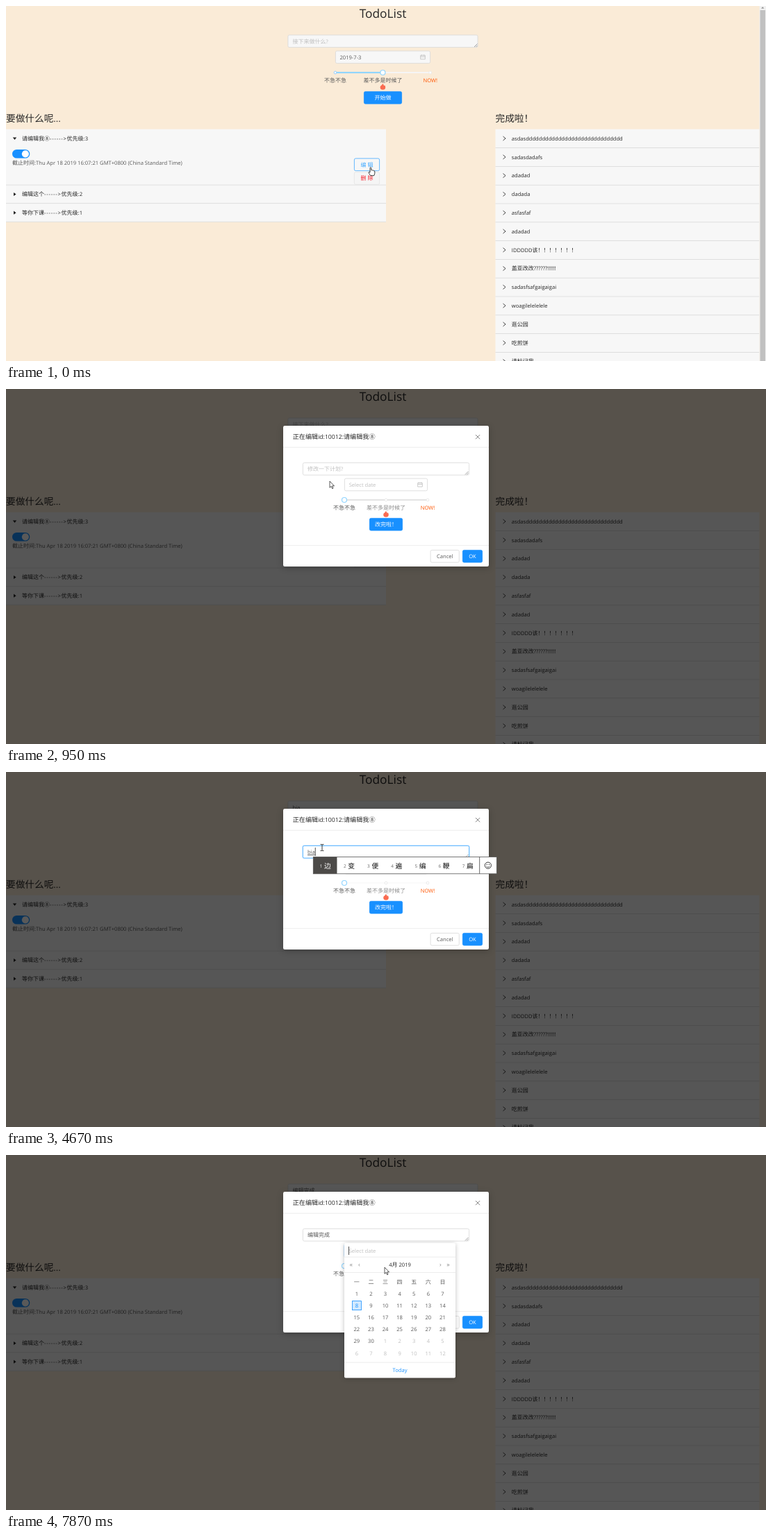
An HTML page that plays this animation: 1094 by 512 pixels, repeating every 7990 ms.

```html
<!DOCTYPE html>
<html lang="zh">
<head>
<meta charset="utf-8">
<title>TodoList</title>
<style>
html, body { margin: 0; width: 100%; height: 100%; overflow: hidden; background: #faebd7; }
svg { display: block; width: 1094px; height: 512px; }
text { font: 8px "Open Sans", "Noto Sans CJK SC", "Noto Sans CJK", sans-serif; text-rendering: geometricPrecision; white-space: pre; }
.latin { font-size: .95em; }
.dash { letter-spacing: .8px; }
</style>
</head>
<body>
<svg id="stage" viewBox="0 0 1094 512"></svg>
<script>
const LOOP = 7990;
const BLUE = '#1890ff', INK = '#595959', DARK = '#262626', HINT = '#bfbfbf', EDGE = '#d9d9d9', PANEL = '#f7f7f7';

// Moments at which the picture is refreshed
const STEPS = [0, 140, 260, 400, 530, 670, 810, 950, 1070, 1190, 1330, 1460, 1890, 2040, 2320, 2820, 3410,
  3820, 4250, 4550, 4700, 4850, 4990, 5140, 5290, 5430, 5580, 5730, 5870, 6000, 6140, 6270,
  6700, 6980, 7140, 7290, 7430, 7580, 7730, 7870];
const KEYS = STEPS.filter(t => t >= 3820 && t <= 6140);
const COMMIT = 6270, PICK = 7140;

// time, x, y, shape
const MOUSE = [[0, 526, 238, 'hand'], [400, 524, 230, 'arrow'], [530, 516, 212, 'arrow'], [670, 498, 181, 'arrow'],
  [810, 480, 156, 'arrow'], [950, 466, 133, 'arrow'], [1070, 457, 114, 'beam'], [1190, 455, 109, 'beam'],
  [6980, 560, 118, 'beam'], [PICK, 587, 141, 'beam'], [7430, 580, 146, 'arrow'], [7580, 563, 155, 'arrow'],
  [7730, 549, 160, 'arrow'], [7870, 545, 162, 'arrow']];

const LETTERS = [...'bianjiwancheng'];
const WORDS = [[1, '不 吧 被 把 并 本 比'], [2, '比 笔 必 币 毕 闭 臂'], [3, '边 变 便 遍 编 鞭 扁'],
  [5, '编剧 编辑 边际 边界 遍及 便捷 变焦'], [6, '编辑 边际 遍及 扁机 苄基 变 边'],
  [7, '编辑完 编辑 遍及 边际 扁机 苄基 边'], [10, '编辑完成 编辑完 编辑 遍及 边际 扁机 苄基'],
  [11, '编辑完成 边际完成 遍及完成 编辑完 编辑 遍及 边际']];
const DONE = ['asdas' + 'd'.repeat(30), 'sadasdadafs', 'adadad', 'dadada', 'asfasfaf', 'adadad', 'IDDDDD该！！！！！！！',
  '盖亚改改??????!!!!!!', 'sadasfsafgaigaigai', 'woagilelelelele', '逛公园', '吃煎饼', '请标记我'];

const pen = document.createElement('canvas').getContext('2d');
const latinWidth = s => (pen.font = '7.6px "Open Sans", sans-serif', pen.measureText(s).width);
const latest = (list, t) => list.filter(e => e[0] <= t).pop();

// Drawing helpers
const text = (x, y, s, fill = INK, more = '') => `<text x="${x}" y="${y}" fill="${fill}" ${more}>` +
  s.replace(/[ -~]+/g, m => `<tspan class="latin${m.startsWith('---') ? ' dash' : ''}">${m.replace('>', '&gt;')}</tspan>`) + '</text>';
const mid = (x, y, s, fill, more = '') => text(x, y, s, fill, 'text-anchor="middle" ' + more);
const size = px => `style="font-size:${px}px"`;
const rect = (x, y, w, h, fill, more = '') => `<rect x="${x}" y="${y}" width="${w}" height="${h}" fill="${fill}" ${more}/>`;
const path = (d, stroke, w = .8, fill = 'none') => `<path d="${d}" stroke="${stroke}" stroke-width="${w}" fill="${fill}"/>`;
const circle = (x, y, r, stroke, w = 1.1, fill = '#fff') => `<circle cx="${x}" cy="${y}" r="${r}" stroke="${stroke}" stroke-width="${w}" fill="${fill}"/>`;
const at = (x, y, s) => `<g transform="translate(${x} ${y})">${s}</g>`;
const rule = (x, y, w, color = EDGE) => rect(x, y, w, .8, color);
const box = (x, y, w, h, fill, edge = EDGE) => rect(x + .4, y + .4, w - .8, h - .8, fill, `rx="2" stroke="${edge}" stroke-width=".8"`);
const button = (x, y, w, h, s, fill = BLUE, color = '#fff', edge = fill) =>
  box(x, y, w, h, fill, edge) + mid(x + w / 2, y + h / 2 + 2.8, s, color);
const caret = (x, y) => rect(x, y, .8, 12, '#222');

function field(x, y, w, fill, focus) {
  return (focus ? rect(x - .8, y - .8, w + 1.6, 20.1, BLUE, 'rx="3" opacity=".2"') : '') +
    box(x, y, w, 18.5, fill, focus ? '#40a9ff' : EDGE);
}
const grip = (x, y) => path(`M${x - 5.5} ${y - 1}l4.5 -4.5M${x - 3} ${y - 1}l2 -2`, '#777', .7);
const calendarIcon = (x, y) => at(x, y, path('M-3.3 -2.6h6.6v5.6h-6.6zM-3.3 -.5h6.6M-1.6 -3.6v2M1.6 -3.6v2', HINT, .8));
const fire = (x, y) => at(x, y, path('M-.4 -4.4C1 -3.4 1.6 -2.2 1.6 -1C2.2 -1.3 2.4 -1.8 2.5 -2.2C3.4 -1.2 3.8 -.2 3.8 .9A3.8 3.5 0 0 1 -3.8 .9C-3.8 -.6 -2.6 -1.4 -1.8 -2C-1 -2.7 -.5 -3.4 -.4 -4.4Z', 'none', 0, '#fa6b50'));

function slider(x, y, gap, value, rail, idle) {
  const stop = x + gap * value;
  return rect(x - 2, y - 1.1, gap * 2 + 4, 2.2, rail, 'rx="1.1"') +
    rect(x, y - 1.1, gap * value, 2.2, '#91d5ff') +
    [0, 1, 2].map(i => circle(x + gap * i, y, 1.9, i <= value ? '#8cc8ff' : '#e8e8e8', .9)).join('') +
    circle(stop, y, 3.5, '#91d5ff', 1.2) +
    mid(x, y + 13.6, '不急不急') + mid(x + gap, y + 13.6, '差不多是时候了', idle) +
    mid(x + gap * 2, y + 13.6, 'NOW!', '#f50', 'font-weight="700"') +
    fire(x + gap, y + 20.3);
}

function page(entry, scrollbar) {
  let s = rect(0, 0, 1094, 512, '#faebd7') +
    mid(542.5, 17, 'TodoList', DARK, 'font-weight="500" ' + size(18.24)) +
    field(405.5, 41.5, 274, PANEL) + grip(679.5, 60) + text(412.5, 53.6, entry || '接下来做什么?', entry ? INK : HINT) +
    field(474, 64.5, 137, PANEL) + text(480.5, 76.6, '2019-7-3') + calendarIcon(600, 73.7) +
    slider(474, 96, 68.4, 1, '#f5f5f5', INK) +
    button(515, 123, 55, 18.5, '开始做') +
    text(0, 166.5, '要做什么呢...', DARK, size(13.68)) + text(704.5, 166.5, '完成啦！', DARK, size(13.68)) +
    rect(0, 177.7, 547, 133.8, PANEL) + rect(704.5, 177.7, 380, 335, PANEL);
  [258, 284.6, 311.1].forEach(y => s += rule(0, y - .3, 547));
  s += path('M9.8 189.5h5.4l-2.7 3.6z', 'none', 0, '#222') + text(23, 193.8, '请编辑我⑧------>优先级:3', DARK);
  ['编辑这个------>优先级:2', '等你下课------>优先级:1'].forEach((label, i) => {
    const y = 271.5 + i * 26.7;
    s += path(`M11 ${y - 2.6}v5.2l3.6 -2.6z`, 'none', 0, '#222') + text(23, y + 2.8, label, DARK);
  });
  s += rect(9, 207, 25.2, 12.6, BLUE, 'rx="6.3"') + circle(27.9, 213.3, 5.1, 'none', 0) +
    text(9, 228.6, '截止时间:Thu Apr 18 2019 16:07:21 GMT+0800 (China Standard Time)') +
    button(501, 219.5, 37, 18.5, '编 辑', PANEL, '#40a9ff', '#40a9ff') +
    button(501, 239.3, 37, 18.5, '删 除', '#f5f5f5', '#f5222d', '#e3e3e3');
  DONE.forEach((label, i) => {
    const y = 191 + i * 26.8;
    s += path(`M715.5 ${y - 3}l3.6 3l-3.6 3`, '#333', .9) + text(727.8, y + 2.8, label, DARK) + rule(704.5, y + 13.2, 380);
  });
  if (scrollbar) s += rect(1084.5, 0, 9.5, 512, '#f1f1f1') + rect(1085.5, 6, 7.5, 506, '#c1c1c1') +
    path('M1087 3.6h4.4l-2.2 -2.4z', 'none', 0, '#8a8a8a');
  return s;
}

function modal(t, entry, composing) {
  const typing = t >= 1330 && t < 7290, picking = t >= PICK;
  const hidden = (t >= 1890 && t < 2320) || (t >= 2820 && t < 3410) || (t >= 6700 && t < 6980);
  const end = 434 + (composing ? latinWidth(entry) : entry.length * 8);
  let s = rect(399, 53, 296, 203, '#fff', 'rx="2.3" style="filter:drop-shadow(0 2px 4px rgba(0,0,0,.25))"') +
    text(412.7, 72.2, '正在编辑id:10012:请编辑我⑧', DARK, 'font-weight="500" ' + size(9.12)) +
    path('M676 66l6.2 6.2M682.2 66l-6.2 6.2', '#777', .9) +
    rule(399, 83.7, 296, '#e8e8e8') + rule(399, 225.3, 296, '#e8e8e8') +
    field(427, 106, 240, '#fff', typing) + grip(666.5, 124.5) +
    text(434, 117.8, entry || '修改一下计划?', entry ? INK : HINT) +
    field(487, 128.7, 120, '#fff', picking) + text(493.7, 141, 'Select date', HINT) + calendarIcon(596, 138) +
    slider(487, 160, 60, 0, t >= 670 && t < 1070 ? '#e4e4e4' : '#fafafa', '#8c8c8c') +
    button(523, 186, 48, 18.5, '改完啦！') +
    button(610.7, 232, 42, 18.5, 'Cancel', '#fff', INK, EDGE) + button(657, 232, 29, 18.5, 'OK');
  if (typing && !picking && !hidden) s += caret(end, 109);
  if (composing) s += rule(434, 119.3, end - 434, '#333') + suggestions(end - 2.5, latest(WORDS, composing)[1].split(' '));
  return s;
}

function suggestions(left, words) {
  let x = left, s = '';
  words.forEach((w, i) => {
    const width = 24.4 + w.length * 9.75;
    if (!i) s += rect(x, 122.5, width, 24.3, '#4c4a48');
    s += text(x + 9.5, 138, String(i + 1), i ? '#666' : '#fff', size(6.8)) + text(x + 15.8, 138.6, w, i ? '#111' : '#fff', size(9.75));
    x += width;
  });
  s += rect(x, 122.5, .8, 24.3, '#444') + circle(x + 12.5, 134.7, 4.6, '#222', .9) +
    path(`M${x + 9.9} 135.8q2.6 3.2 5.2 0`, '#222', .8) +
    circle(x + 10.9, 133.4, .7, 'none', 0, '#222') + circle(x + 14.1, 133.4, .7, 'none', 0, '#222');
  return rect(left, 122.5, x + 25 - left, 24.3, '#fff', 'stroke="#555" stroke-width=".8"') + s;
}

function calendar(t) {
  const col = i => 504.8 + i % 7 * 20.6;
  let s = rect(487, 127, 160, 194.5, '#fff', 'rx="2" style="filter:drop-shadow(0 1px 3px rgba(0,0,0,.25))"') +
    caret(493.2, 132) + text(493.7, 141, 'Select date', HINT) +
    [146.7, 169.2, 298.7].map(y => rule(487, y, 160, '#e8e8e8')).join('') +
    mid(567, 161.3, '4月 2019', DARK, 'font-weight="500"') + mid(567, 313, 'Today', BLUE);
  [[496.8, '«'], [508.4, '‹'], [625.4, '›'], [636.6, '»']].forEach(([x, c]) => s += mid(x, 161.3, c, '#888', size(9)));
  [...'一二三四五六日'].forEach((d, i) => s += mid(col(i), 186, d));
  s += rect(498.4, 210.6, 13, 13, '#d1e9ff', `stroke="${BLUE}" stroke-width=".8"`);
  for (let i = 0; i < 42; i++) {
    const color = i === 7 ? BLUE : i < 30 ? INK : HINT;
    s += mid(col(i), 202.9 + Math.floor(i / 7) * 17.13, String(i % 30 + 1), color, i === 7 ? 'font-weight="600"' : '');
  }
  const k = t < 7430 ? .93 : 1;
  return `<g opacity="${t < 7430 ? .7 : 1}" transform="translate(0 ${127 * (1 - k)}) scale(1 ${k})">${s}</g>`;
}

const POINTERS = {
  arrow: path('M0 0V9.3L2.1 7.3L3.6 10.7L5 10.1L3.6 6.8H6.5Z', '#111', .7, '#fff'),
  beam: path('M-2.4 -4.6h1.8l.6 .6l.6 -.6h1.8M0 -4v8M-2.4 4.6h1.8l.6 -.6l.6 .6h1.8', '#222', .9),
  hand: path('M-2 1V-4.6Q-1.1 -6 -.2 -4.6V-1.2Q.8 -1.9 1.5 -.9Q2.6 -1.5 3.2 -.4Q4.7 -.7 4.8 .8V3.4L3.8 6.6H-1.4L-4 2.4Q-4.3 .7 -2 2Z', '#111', .8, '#fff')
};

function scene(t) {
  const keys = KEYS.filter(k => k <= t).length, composing = t < COMMIT ? keys : 0;
  const entry = t >= COMMIT ? '编辑完成'
    : LETTERS.slice(0, keys).map((c, i) => ([4, 6, 9].includes(i) ? "'" : '') + c).join('');
  let s = page(entry, t < 140);
  if (t >= 140) {
    const rest = 1 - Math.min(1, (t - 60) / 240), k = 1 - .8 * rest ** 4.9;
    s += rect(0, 0, 1094, 512, '#000', `opacity="${.65 * (1 - rest ** 1.4)}"`) +
      `<g opacity="${1 - rest ** 7.4}" transform="translate(${526 * (1 - k)} ${238 * (1 - k)}) scale(${k})">${modal(t, entry, composing)}</g>`;
  }
  if (t >= 7290) s += calendar(t);
  const [, x, y, shape] = latest(MOUSE, t);
  return s + at(x, y, POINTERS[shape]);
}

const stage = document.getElementById('stage');
let start, shown = -1;
function tick(now) {
  start ??= now;
  const t = (now - start) % LOOP, step = STEPS.filter(s => s <= t).pop();
  if (step !== shown) stage.innerHTML = scene(shown = step);
  requestAnimationFrame(tick);
}
stage.innerHTML = scene(0);
requestAnimationFrame(tick);
</script>
</body>
</html>
```
